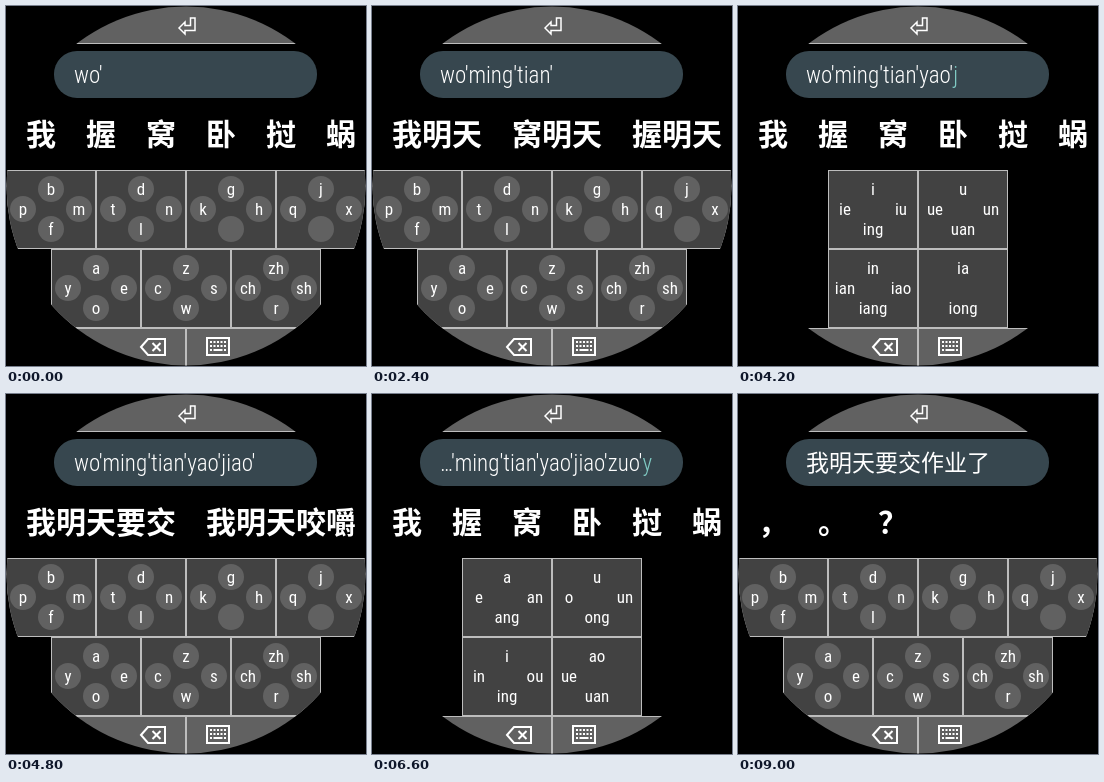
An HTML page with a canvas for the animation above (9600 ms loop, 360 by 360 pixels).

```html
<!DOCTYPE html>
<html lang="zh-CN">
<head>
<meta charset="utf-8">
<title>Round pinyin keyboard</title>
<style>
html, body { margin: 0; width: 100%; height: 100%; overflow: hidden; background: #000; }
canvas { display: block; width: 360px; height: 360px; }
</style>
</head>
<body>
<canvas id="stage"></canvas>
<script>
const canvas = document.getElementById('stage');
const ctx = canvas.getContext('2d');
const ratio = window.devicePixelRatio || 1;
canvas.width = canvas.height = 360 * ratio;

const STEP = 600;
const LATIN = '"Roboto Condensed", Roboto, "Noto Sans CJK SC", sans-serif';
const CJK = '"Noto Sans CJK SC", "Noto Sans CJK", sans-serif';
const FONT = {
  input: `300 condensed 23px ${LATIN}`,
  hanzi: `400 23px ${CJK}`,
  key: `400 condensed 17px ${LATIN}`,
  choice: `700 30px ${CJK}`
};
const GREY = '#616161', KEY = '#424242', LINE = '#bdbdbd';
const INPUT = { left: 68, width: 223, base: 77 };

// Each key lists its top, left, right and bottom label.
const INITIALS = [
  ['b p m f', 'd t n l', 'g k h -', 'j q x -'],
  ['a y e o', 'z c s w', 'zh ch sh r']
];
const FINALS = {
  m: [['a ai an ang', 'u ei en eng', 'i ie iu ing'], ['in ian iao ao', 'e o ou -']],
  t: [['a ai an ang', 'u ui un eng', 'i ie - ing'], ['- ian iao ao', 'e - ou ong', 'uo - - uan']],
  y: [['a e an ang', 'u o un ong'], ['i in ou ing', 'ao ue - uan']],
  j: [['i ie iu ing', 'u ue un uan'], ['in ian iao iang', 'ia - - iong']],
  z: [['a ai an ang', 'u ui un uan'], ['e ei en eng', 'i ao ou ong']],
  l: [['a ai an ang', 'u ei un eng', 'i ie iu ing'], ['in ian iao ao', 'e iang ou ong', 'uo ü üe uan']]
};

const SINGLE = '我 握 窝 卧 挝 蜗';
const SYLLABLES = [
  ['wo', SINGLE],
  ['ming', '我明 我名 我命 我鸣'],
  ['tian', '我明天 窝明天 握明天'],
  ['yao', '我明天要 我明天约 我明天药'],
  ['jiao', '我明天要交 我明天咬嚼'],
  ['zuo', '我明天要叫做 我明天要交做'],
  ['ye', '我明天要交作业 我明天要叫作业'],
  ['le', '我明天要交作业了 我明天要叫作业了']
];

function buildStates() {
  const states = [];
  let typed = '';
  SYLLABLES.forEach(([syllable, choices], i) => {
    if (i) states.push({ typed, pending: syllable[0], choices: SINGLE });
    typed += syllable + "'";
    states.push({ typed, pending: '', choices });
  });
  states.push({ done: '我明天要交作业了', choices: '， 。 ？' });
  return states;
}
const states = buildStates();

function text(str, x, y, font, color = '#fff', align = 'left') {
  ctx.font = font;
  ctx.fillStyle = color;
  ctx.textAlign = align;
  ctx.fillText(str, x, y);
}

function rect(x, y, w, h, color) {
  ctx.fillStyle = color;
  ctx.fillRect(x, y, w, h);
}

function outline(points, width, close = true) {
  ctx.beginPath();
  points.forEach(([x, y]) => ctx.lineTo(x, y));
  if (close) ctx.closePath();
  ctx.lineWidth = width;
  ctx.strokeStyle = '#fff';
  ctx.stroke();
}

function drawKey(x, y, labels, discs) {
  rect(x, y, 90, 79, LINE);
  rect(x + 1, y + 1, 88, 77, KEY);
  const spots = [[0, -20], [-28, 0], [28, 0], [0, 20]];
  labels.split(' ').forEach((label, i) => {
    const cx = x + 45 + spots[i][0], cy = y + 39 + spots[i][1];
    if (discs) {
      ctx.fillStyle = GREY;
      ctx.beginPath();
      ctx.arc(cx, cy, 13, 0, Math.PI * 2);
      ctx.fill();
    }
    if (label !== '-') text(label, cx, cy + 6, FONT.key, '#fff', 'center');
  });
}

function drawKeys(rows, discs) {
  rows.forEach((row, r) => row.forEach((labels, i) =>
    drawKey(180 - row.length * 45 + i * 90, 164 + r * 79, labels, discs)));
}

function drawBars() {
  rect(0, 0, 360, 37, GREY);
  rect(0, 37, 360, 1, LINE);
  rect(0, 322, 360, 38, GREY);
  rect(0, 322, 360, 1, LINE);
  rect(179, 322, 2, 38, LINE);

  outline([[173, 22], [179, 16], [179, 19.5], [184.5, 19.5], [184.5, 12], [189, 12],
    [189, 24.5], [179, 24.5], [179, 28]], 1.5);

  outline([[135, 341], [142, 333], [159, 333], [159, 349], [142, 349]], 2);
  outline([[146.5, 337], [154.5, 345]], 2, false);
  outline([[154.5, 337], [146.5, 345]], 2, false);

  outline([[201, 332], [223, 332], [223, 349], [201, 349]], 2);
  for (let row = 0; row < 3; row++)
    for (let col = 0; col < 5; col++)
      if (row < 2 || col % 4 === 0) rect(204 + col * 3.5, 335 + row * 4, 2, 2, '#fff');
  rect(207.5, 343, 9, 2, '#fff');
}

function drawInput({ typed, pending, done }) {
  ctx.fillStyle = '#37474f';
  ctx.beginPath();
  ctx.roundRect(48, 45, 263, 47, 23);
  ctx.fill();
  if (done) return text(done, INPUT.left, INPUT.base, FONT.hanzi);

  ctx.font = FONT.input;
  const fits = s => ctx.measureText(s + pending).width <= INPUT.width;
  let shown = typed;
  for (let cut = 1; !fits(shown); cut++) shown = '…' + typed.slice(cut);
  text(shown, INPUT.left, INPUT.base, FONT.input);
  const end = INPUT.left + ctx.measureText(shown).width;
  text(pending, end, INPUT.base, FONT.input, '#80cbc4');
}

function drawChoices(choices) {
  let x = 20;
  for (const choice of choices.split(' ')) {
    text(choice, x, 139, FONT.choice);
    x += choice.length * 30 + 30;
  }
}

function draw(time) {
  const state = states[Math.floor(time / STEP) % states.length];
  ctx.setTransform(ratio, 0, 0, ratio, 0, 0);
  rect(0, 0, 360, 360, '#000');
  ctx.save();
  ctx.beginPath();
  ctx.arc(180, 180, 179.5, 0, Math.PI * 2);
  ctx.clip();
  drawBars();
  drawInput(state);
  drawChoices(state.choices);
  if (state.pending) drawKeys(FINALS[state.pending], false);
  else drawKeys(INITIALS, true);
  ctx.restore();
}

const start = performance.now();
function tick() {
  draw(performance.now() - start);
  requestAnimationFrame(tick);
}
tick();
</script>
</body>
</html>
```
